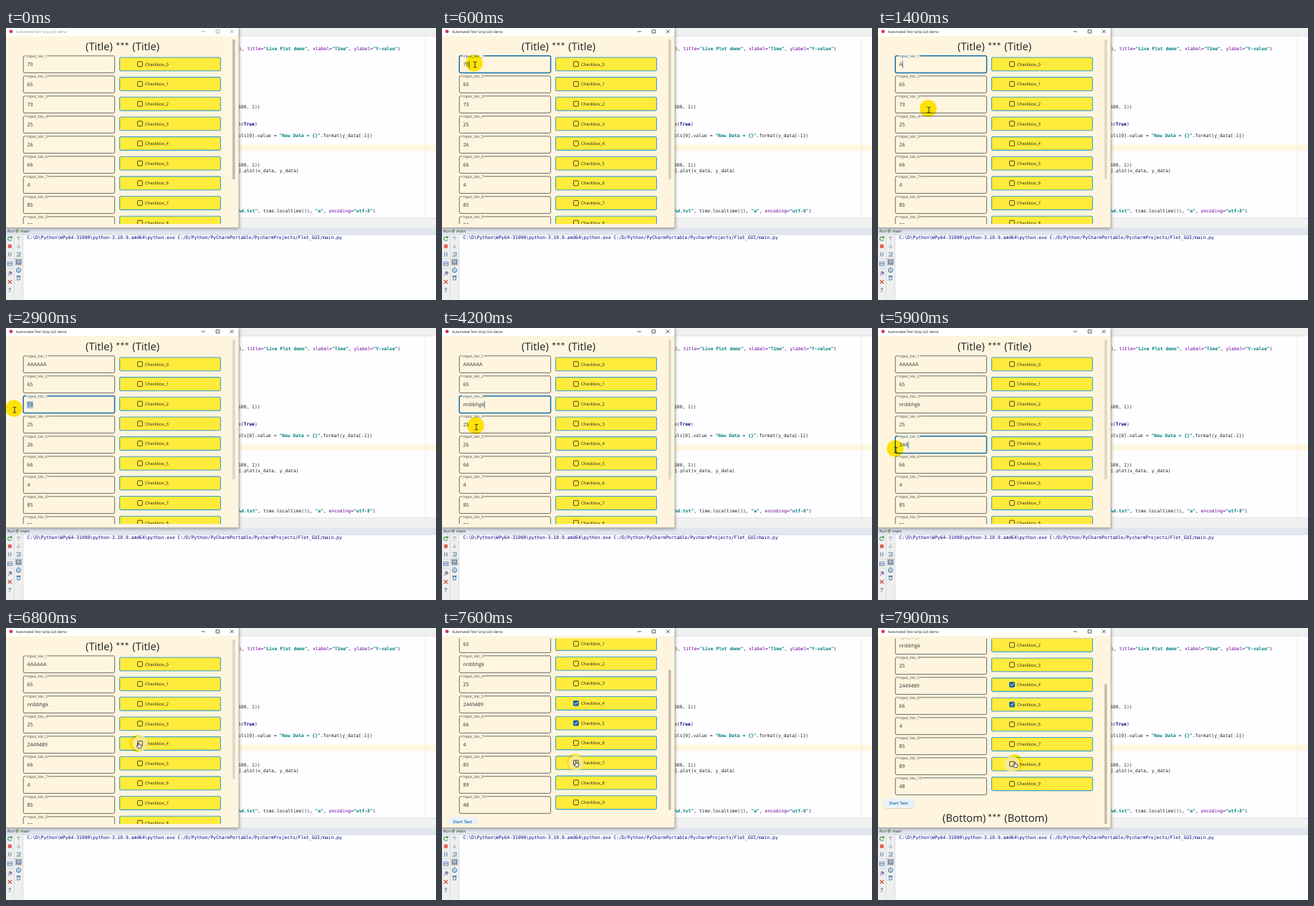
Write an HTML page that moves like this. It is 600 by 379 pixels and loops after 8 s.

```html
<!DOCTYPE html>
<html lang="en">
<head>
<meta charset="utf-8">
<title>Form demo</title>
<style>
  html, body { margin: 0; width: 100%; height: 100%; overflow: hidden; background: #fff; }
  svg { display: block; width: 100vw; height: 100vh; }
  text { font-family: "Open Sans", "Noto Sans", sans-serif; fill: #222; white-space: pre; text-rendering: geometricPrecision; }
  .code { font: 6.35px "DejaVu Sans Mono", "Noto Sans Mono", monospace; }
  .code .str { fill: #008080; font-weight: bold; }
  .code .arg { fill: #660099; }
  .code .key { fill: #000080; font-weight: bold; }
  .code.path { fill: #000080; }
  .label { font-size: 5.3px; fill: #444; }
  .value { font-size: 7.1px; fill: #333; }
  .check { font-size: 5.95px; }
  .head { font-size: 14.8px; }
  .stars { font-family: Lato, sans-serif; }
  .line { fill: none; stroke-linecap: round; stroke-linejoin: round; }
  #halo { mix-blend-mode: multiply; }
</style>
</head>
<body>
<svg id="stage" viewBox="0 0 600 379" preserveAspectRatio="none">
  <defs>
    <clipPath id="view"><rect x="0" y="14.5" width="325" height="258.4"/></clipPath>
    <filter id="soft" x="-10%" y="-10%" width="120%" height="120%"><feGaussianBlur stdDeviation="2.5"/></filter>
  </defs>
  <rect width="600" height="379" fill="#fefdff"/>

  <g id="editor">
    <rect x="300" width="300" height="11" fill="#f0f0f1"/>
    <path d="M300 11H600M300 264.7H600" stroke="#d0d0d2" stroke-width=".7"/>
    <rect x="300" y="162.4" width="300" height="8.4" fill="#fff8e0"/>
    <path d="M585.5 11V264.5" stroke="#e2e2e4" stroke-width=".7"/>
    <rect x="300" y="265" width="300" height="14" fill="#f1f1f2"/>
  </g>

  <g id="console">
    <rect y="278" width="600" height="10" fill="#e2e7ef"/>
    <path d="M0 288H600" stroke="#c4cad4" stroke-width=".6"/>
    <rect y="288" width="24" height="91" fill="#efeff0"/>
    <path d="M11.3 288V379M23.7 288V379" stroke="#cfcfd1" stroke-width=".7"/>
    <rect x="12.6" y="321" width="9.8" height="10" fill="#c6c6c8"/>
    <text x="2" y="285.2" font-size="5.4">Run</text>
    <circle cx="15.5" cy="283" r="2.4" fill="#8fae7a"/>
    <text x="20" y="285.2" font-size="5.4">main</text>
    <text class="code path" x="29.5" y="293.6">C:\D\Python\WPy64-31090\python-3.10.9.amd64\python.exe C:/D/Python/PyCharmPortable/PycharmProjects/Flet_GUI/main.py</text>
    <g class="line" stroke-width="1.1">
      <path d="M7.6 292A2.7 2.7 0 1 0 7.6 295M8 290V292.4H5.8" stroke="#3f9b4f"/>
      <path d="M3.8 313V318M6.8 313V318" stroke="#5a7fa8"/>
      <path d="M2.5 326H8.5V331H2.5ZM2.5 328.5H8.5" stroke="#5f87b3"/>
      <path d="M3 345L5 342.5M4 340L7.5 343.5M6 339L8.5 341.5L6 342Z" stroke="#8579a8"/>
      <path d="M3 351.5L7.6 356M7.6 351.5L3 356" stroke="#c9503f"/>
      <path d="M17.5 296V290.5M15.4 292.5L17.5 290.3L19.6 292.5M17.5 301V306.5M15.4 304.5L17.5 306.7L19.6 304.5" stroke="#b4b9c0"/>
      <path d="M14.8 313H20V316H16M14.8 318H20" stroke="#5b8c9c"/>
      <path d="M14.6 323.5H20.4V329H14.6ZM15 327H20" stroke="#5f7f9f"/>
      <path d="M14.6 336H20.4V339H14.6ZM16 334H19M16 340.5H19" stroke="#4f86b0"/>
      <path d="M15.4 346.5H19.6L19 351H16ZM15 345.5H20" stroke="#4f86b0"/>
    </g>
    <rect x="2.8" y="301.6" width="5" height="5" fill="#e05a50"/>
    <path d="M1.5 322H9.8M1.5 335H9.8" stroke="#c8c8c8" stroke-width=".7"/>
    <text x="3.2" y="368" font-size="8" font-weight="bold" style="fill:#4173a8">?</text>
  </g>

  <g id="window">
    <rect y="1" width="325.5" height="279" fill="#000" opacity=".34" filter="url(#soft)"/>
    <rect width="325" height="278.4" fill="#fff5df"/>
    <rect width="325" height="11" fill="#fff"/>
    <path d="M325 0V278.3H0" fill="none" stroke="#8d8d8d" stroke-width=".6"/>
    <circle cx="7" cy="4.8" r="2.4" fill="#d2305f"/>
    <g id="chrome">
      <text x="14" y="6.8" font-size="4.75" style="fill:inherit">Automated Test Scrip GUI demo</text>
      <path class="line" stroke="currentColor" stroke-width=".7" d="M273 5H277.5M293.5 2.8H297.7V7H293.5ZM313 2.7L317.3 7M317.3 2.7L313 7"/>
    </g>
    <g clip-path="url(#view)">
      <g id="content"></g>
      <rect id="thumb" x="316" width="3.6" height="195" rx="1" fill="#77736a"/>
    </g>
  </g>

  <circle id="halo" r="11.8" fill="#ffec08"/>
  <g id="hover">
    <circle r="10.8" fill="#f6eca6" opacity=".85"/>
    <rect x="-3.4" y="-3.4" width="6.8" height="6.8" rx=".8" fill="none" stroke="#4a4468"/>
  </g>
  <g id="pointer">
    <path id="beam" class="line" stroke="#222" stroke-width=".9" d="M-2 -3.8Q0 -3.8 0 -2.8Q0 -3.8 2 -3.8M0 -3V3M-2 4Q0 4 0 3Q0 4 2 4"/>
    <path id="hand" fill="#e8e6d8" stroke="#333" stroke-width=".8" stroke-linejoin="round" d="M-.8 -3V1.4L-2 .4Q-3 .6 -2.5 1.6L-.6 4.6H3.2Q4.2 2.6 4 .2Q3.2 -.6 .6 -.8V-3Q-.1 -4 -.8 -3Z"/>
    <path id="arrow" fill="#fff" stroke="#222" stroke-width=".7" d="M0 0V8L1.9 6.3L3.2 9L4.4 8.4L3.2 5.8H5.8Z"/>
  </g>
</svg>
<script>
const LOOP = 8000, STEP = 100;
const FIELD_PITCH = 28, CHECK_PITCH = 27.65, SCROLL = 82, TEXT_X = 29.5;
const CHECK_X = 187, CHECK_Y = 50.3;
const $ = id => document.getElementById(id);

function add(parent, tag, attrs = {}, text) {
  const el = document.createElementNS('http://www.w3.org/2000/svg', tag);
  set(el, attrs);
  if (text !== undefined) el.textContent = text;
  parent.appendChild(el);
  return el;
}
function set(el, attrs) {
  for (const name in attrs) el.setAttribute(name, attrs[name]);
}
const show = (el, on) => el.setAttribute('visibility', on ? 'inherit' : 'hidden');

// Each code line is a list of [text, class] runs.
function codeLine(x, y, ...runs) {
  const line = add($('editor'), 'text', { class: 'code', x, y });
  for (const [text, kind = ''] of runs) add(line, 'tspan', { class: kind }, text);
}
codeLine(325, 31.4, ['), '], ['title=', 'arg'], ['"Live Plot demo"', 'str'], [', '], ['xlabel=', 'arg'],
  ['"Time"', 'str'], [', '], ['ylabel=', 'arg'], ['"Y-value"', 'str'], [')']);
codeLine(324, 112.2, ['100, 1))']);
codeLine(324, 136.4, ['e('], ['True', 'key'], [')']);
codeLine(324, 152.4, ['ols[0].value = '], ['"New Data = {}"', 'str'], ['.format(y_data[-1])']);
codeLine(324, 192.6, ['100, 1))']);
codeLine(324.5, 200.8, ['].plot(x_data, y_data)']);
codeLine(324.5, 257.2, ['%d.txt"', 'str'], [', time.localtime()), '], ['"a"', 'str'], [', '],
  ['encoding=', 'arg'], ['"utf-8"', 'str'], [')']);

const content = $('content');

function heading(word, x, y) {
  const el = add(content, 'text', { class: 'head', y });
  add(el, 'tspan', { x }, word);
  add(el, 'tspan', { x: 153, class: 'stars' }, '***');
  add(el, 'tspan', { x: 176.3 }, word);
}

function makeField(value, i) {
  const g = add(content, 'g', { transform: `translate(0 ${i * FIELD_PITCH})` });
  const border = add(g, 'path', { class: 'line',
    d: 'M27.5 38.8H26Q24.2 38.8 24.2 40.6V60.6Q24.2 62.4 26 62.4H149.8Q151.6 62.4 151.6 60.6V40.6Q151.6 38.8 149.8 38.8H' + (i === 9 ? 62 : 59) });
  const mark = add(g, 'rect', { x: 29, y: 46, width: 9, height: 10, fill: '#9fc3dc' });
  const label = add(g, 'text', { class: 'label', x: 29, y: 41 }, 'Input_Var_' + (i + 1));
  const text = add(g, 'text', { class: 'value', x: TEXT_X, y: 53.4 }, value);
  const caret = add(g, 'path', { stroke: '#1568a8', 'stroke-width': .9 });
  return { border, mark, label, text, caret };
}

function makeCheck(i) {
  const g = add(content, 'g', { transform: `translate(0 ${i * CHECK_PITCH})` });
  add(g, 'rect', { x: 158.6, y: 41, width: 140.8, height: 18.8, rx: 1.8, fill: '#ffeb3b', stroke: '#3aa2cc', 'stroke-width': 1.1 });
  add(g, 'text', { class: 'check', x: 194, y: 52.6 }, 'Checkbox_' + i);
  const box = add(g, 'rect', { x: CHECK_X - 3.4, y: CHECK_Y - 3.4, width: 6.8, height: 6.8, rx: .8 });
  const tick = add(g, 'path', { class: 'line', stroke: '#fff', d: 'M185 50.4L186.5 51.9L189.2 48.8' });
  return { box, tick };
}

heading('(Title)', 111, 30.6);
const fields = [70, 65, 73, 25, 26, 66, 4, 85, 89, 48].map(makeField);
const checks = fields.map((_, i) => makeCheck(i));
add(content, 'rect', { x: 6.5, y: 320.6, width: 44.5, height: 13.4, rx: 6.7, fill: '#b9b5aa', opacity: .5 });
add(content, 'rect', { x: 6.5, y: 319.6, width: 44.5, height: 13.4, rx: 6.7, fill: '#ebf1f8' });
add(content, 'text', { x: 15.3, y: 328.4, 'font-size': 5.8, 'font-weight': 600, style: 'fill:#1568a8' }, 'Start Test');
heading('(Bottom)', 90, 352.4);

const clamp = v => Math.max(0, Math.min(1, v));
const ease = v => v * v * (3 - 2 * v);
const ramp = (t, from, to) => ease(clamp((t - from) / (to - from)));

// Pointer stops: time, x, y
const stops = [
  [100, 530, 282], [500, 48, 51], [600, 46, 51], [900, 12, 52], [1100, 12, 52],
  [1400, 71, 114], [2000, 71, 115], [2300, 42, 109], [2700, 12, 114], [3800, 12, 114],
  [4200, 48, 138], [4400, 42, 171], [4600, 42, 171], [5000, 21, 171], [5900, 25, 170],
  [6200, 70, 168], [6500, 178, 157], [6700, 185, 163], [6900, 185, 163], [7100, 187, 189],
  [7600, 187, 189], [7900, 191, 190]
];
function pointerAt(t) {
  let i = 0;
  while (i < stops.length - 2 && t >= stops[i + 1][0]) i++;
  const [t0, x0, y0] = stops[i], [t1, x1, y1] = stops[i + 1];
  const k = ramp(t, t0, t1);
  return [x0 + (x1 - x0) * k, y0 + (y1 - y0) * k];
}

const edits = [
  { field: 0, focus: 600, select: 700, type: 1300, rest: 1750, done: 2000, blur: 2500, before: '70', after: 'AAAAAA' },
  { field: 2, focus: 2500, select: 2600, type: 3000, rest: 3000, done: 3900, blur: 4700, before: '73', after: 'nnbbhgk' },
  { field: 4, focus: 4700, select: 4900, type: 5500, rest: 5600, done: 6400, blur: 6700, before: '26', after: '2449489' }
];
function typed(e, t) {
  if (t < e.type) return e.before;
  const extra = clamp((t - e.rest) / (e.done - e.rest)) * (e.after.length - 1);
  return e.after.slice(0, 1 + Math.floor(extra));
}

function drawFields(t) {
  fields.forEach((f, i) => {
    const e = edits.find(e => e.field === i);
    const focused = !!e && t >= e.focus && t < e.blur;
    const selected = focused && t >= e.select && t < e.type;
    if (e) f.text.textContent = typed(e, t);
    set(f.border, { stroke: focused ? '#1b6ca3' : '#484848', 'stroke-width': focused ? 1.5 : .8 });
    f.label.style.fill = focused ? '#1b5d8c' : '';
    show(f.mark, selected);
    show(f.caret, focused && !selected);
    if (focused) {
      const x = TEXT_X + f.text.getComputedTextLength() + .4;
      set(f.caret, { d: `M${x} 45.8V56` });
    }
  });
}

function drawChecks(t) {
  const checkedFrom = { 4: 6900, 5: 7300 };
  checks.forEach(({ box, tick }, i) => {
    const on = t >= checkedFrom[i];
    set(box, { fill: on ? '#1764a5' : 'none', stroke: on ? '#1764a5' : '#4a4626' });
    show(tick, on);
  });
}

function drawPointer(t, scrolled) {
  const [x, y] = pointerAt(t);
  const row = Math.round((y + scrolled - CHECK_Y) / CHECK_PITCH);
  const boxY = CHECK_Y + row * CHECK_PITCH - scrolled;
  const overRow = x > 158 && x < 300 && Math.abs(y - boxY) < 9.5;
  const overBox = overRow && Math.hypot(x - CHECK_X, y - boxY) < 9;
  const overText = x > 0 && x < 152;
  const visible = t >= 100;
  show($('pointer'), visible);
  show($('halo'), visible);
  show($('hover'), overBox && checks[row].tick.getAttribute('visibility') === 'hidden');
  set($('pointer'), { transform: `translate(${x} ${y})` });
  set($('halo'), { cx: x - 1, cy: y - 2 });
  set($('hover'), { transform: `translate(${CHECK_X} ${boxY})` });
  show($('beam'), overText);
  show($('hand'), overRow);
  show($('arrow'), !overRow && !overText);
}

function render(time) {
  const t = Math.floor((time % LOOP) / STEP) * STEP;
  const scroll = ramp(t, 7350, 7750);
  const active = t >= 600;
  $('chrome').style.fill = $('chrome').style.color = active ? '#111' : '#888';
  set(content, { transform: `translate(0 ${-SCROLL * scroll})` });
  const glow = t < 1000 ? 1 - ramp(t, 200, 800) : ramp(t, 7200, 7450);
  set($('thumb'), { y: 16 + 62 * scroll, opacity: .24 + .2 * glow });
  drawFields(t);
  drawChecks(t);
  drawPointer(t, SCROLL * scroll);
}

const start = performance.now();
function tick() {
  render(performance.now() - start);
  requestAnimationFrame(tick);
}
tick();
</script>
</body>
</html>
```
